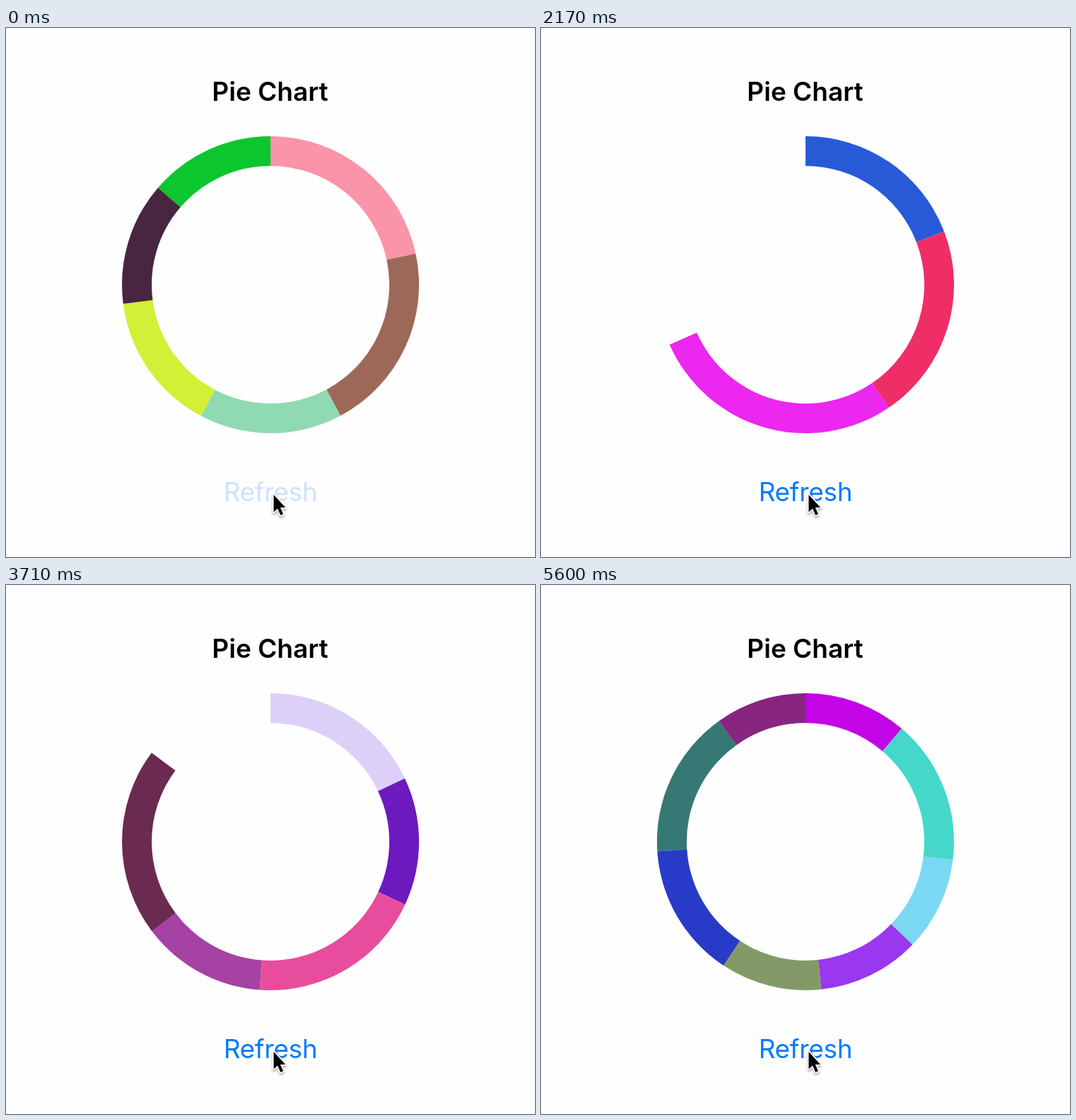
Animation, 748 px wide and 748 px high, one loop 5.67 s. Source, as an HTML page:

```html
<!DOCTYPE html>
<html lang="en">
<head>
<meta charset="utf-8">
<title>Pie Chart</title>
<style>
  html, body { margin: 0; width: 100%; height: 100%; overflow: hidden; background: #fefefe; }
  svg { display: block; width: 100%; height: 100%; }
  text { font-family: Inter, "Liberation Sans", sans-serif; font-size: 37px; text-anchor: middle; }
  #title { font-weight: 600; }
  #button { fill: #0a7aff; letter-spacing: -0.3px; }
  #pointer { stroke: #fff; stroke-width: 3.6px; stroke-linejoin: round; paint-order: stroke;
    filter: drop-shadow(0 2px 1.5px rgba(0, 0, 0, .35)); }
</style>
</head>
<body>
<svg viewBox="0 0 748 748">
  <text id="title" x="373.5" y="103">Pie Chart</text>
  <g id="ring"></g>
  <text id="button" x="374" y="669">Refresh</text>
  <path id="pointer" d="M378.5 660V684.5L384 679.5L388.2 689L392 687.3L387.8 678H395.2Z"/>
</svg>
<script>
const LOOP = 5670, STEP = 70, GROW = 1000, PRESS = 100, FADE = 180;
const CX = 374, CY = 363, OUTER = 210, INNER = 168;

// start: moment the chart begins to grow; ends: closing angle of each slice
const charts = [
  { start: -LOOP, ends: [77.9, 151.9, 207.9, 262.6, 310.8, 360],
    colors: ["#fa94a8", "#9e6859", "#8fdab0", "#d3ef36", "#482640", "#0cc62f"] },
  { start: 21, ends: [90.9, 136.4, 214.3, 308.8, 360],
    colors: ["#82cb08", "#2a4060", "#b0526a", "#803c32", "#ed6958"] },
  { start: 1560, ends: [100.8, 213.3, 360],
    colors: ["#285ad8", "#ef2e67", "#eb27f0"] },
  { start: 2977, ends: [76, 134.9, 216.1, 273.4, 360],
    colors: ["#dcd0f8", "#6c19bf", "#e84d9d", "#a542a3", "#6b2a50"] },
  { start: 4575, ends: [40.4, 97.1, 133.9, 173.9, 213.5, 266.3, 324.4, 360],
    colors: ["#c204e6", "#45d8ca", "#7bd8f2", "#9a38ef", "#839a68", "#283ac8", "#357874", "#88267f"] }
];

const ring = document.getElementById("ring");
const button = document.getElementById("button");
const slices = Array.from({ length: 8 }, () =>
  ring.appendChild(document.createElementNS("http://www.w3.org/2000/svg", "path")));

const clamp = v => Math.min(1, Math.max(0, v));

// cubic-bezier(.42, 0, .58, 1), solved by bisection
function easeInOut(x) {
  if (x <= 0 || x >= 1) return clamp(x);
  let lo = 0, hi = 1, s;
  for (let i = 0; i < 24; i++) {
    s = (lo + hi) / 2;
    const bx = 1.26 * s * (1 - s) ** 2 + 1.74 * s * s * (1 - s) + s ** 3;
    if (bx < x) lo = s; else hi = s;
  }
  return s * s * (3 - 2 * s);
}

function point(r, deg) {
  const a = deg * Math.PI / 180;
  return `${(CX + r * Math.sin(a)).toFixed(2)} ${(CY - r * Math.cos(a)).toFixed(2)}`;
}

function slicePath(from, to) {
  const big = to - from > 180 ? 1 : 0;
  return `M${point(OUTER, from)}A${OUTER} ${OUTER} 0 ${big} 1 ${point(OUTER, to)}` +
    `L${point(INNER, to)}A${INNER} ${INNER} 0 ${big} 0 ${point(INNER, from)}Z`;
}

function buttonOpacity(t) {
  for (const { start } of charts) {
    const d = t - start;
    if (d >= -PRESS && d < FADE) return 0.2 + 0.8 * clamp(d / FADE);
  }
  return 1;
}

function draw(t) {
  const chart = charts.filter(c => c.start <= t).pop();
  const grown = easeInOut((t - chart.start) / GROW);
  slices.forEach((slice, i) => {
    const on = i < chart.ends.length && grown > 0;
    slice.setAttribute("d", on ? slicePath((chart.ends[i - 1] || 0) * grown, chart.ends[i] * grown) : "");
    if (on) slice.setAttribute("fill", chart.colors[i]);
  });
  button.setAttribute("fill-opacity", buttonOpacity(t));
}

const begin = performance.now();
function tick() {
  const t = (performance.now() - begin) % LOOP;
  draw(Math.floor(t / STEP) * STEP);
  requestAnimationFrame(tick);
}
draw(0);
requestAnimationFrame(tick);
</script>
</body>
</html>
```
